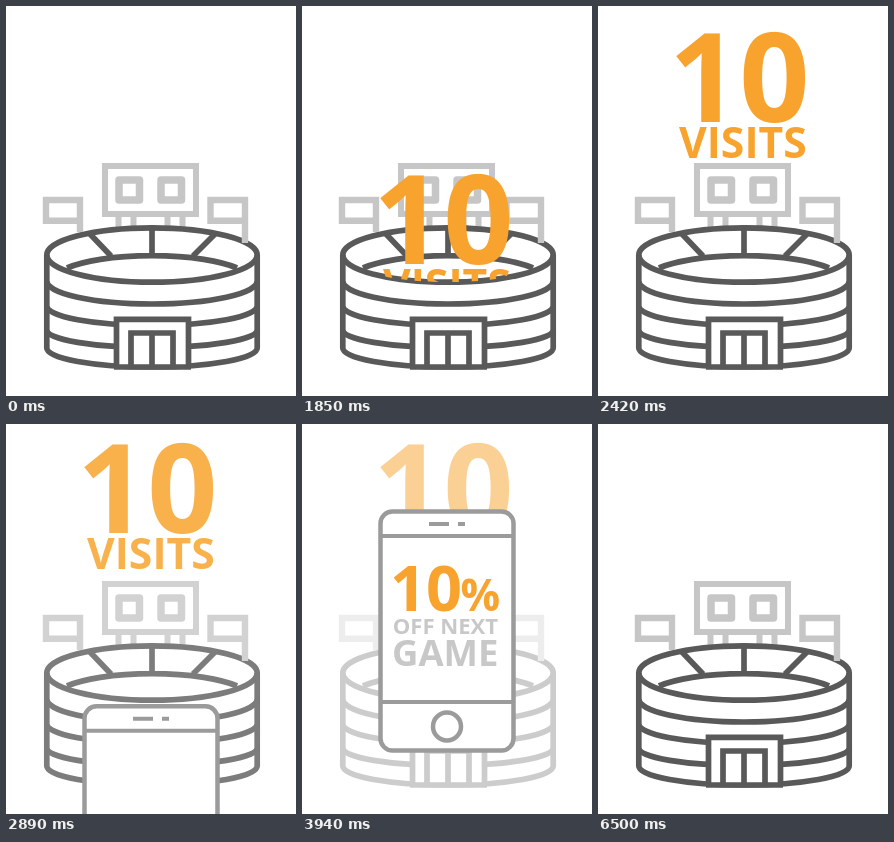
Recreate the animation shown at these times as an HTML page. Size 290 by 390 pixels, loop 6700 ms.

```html
<!DOCTYPE html>
<html lang="en">
<head>
<meta charset="utf-8">
<title>Stadium visits reward</title>
<style>
html, body { margin: 0; width: 100%; height: 100%; overflow: hidden; background: #fff; }
svg { display: block; width: 100%; height: 100%; }
text { font-family: "Open Sans", sans-serif; font-weight: 700; fill: #f8a32d; }
.gray text { fill: #c8c8c8; }
</style>
</head>
<body>
<svg viewBox="0 0 290 390">
  <defs>
    <clipPath id="aboveRim">
      <path d="M0 0H290V249H251.5A105.5 27 0 0 1 40.5 249H0Z"/>
    </clipPath>
    <g id="stadium" fill="none" stroke-width="5.7">
      <g stroke="#c6c6c6" stroke-width="6">
        <path d="M99 160H190V208H99ZM112.5 209V222M127.5 209V222M161.5 209V222M176.5 209V222"/>
        <path d="M113 174H133.5V194H113ZM155 174H175.5V194H155Z" stroke-width="7.5" stroke-linejoin="round"/>
      </g>
      <g stroke="#595959">
        <ellipse cx="146" cy="249" rx="105.2" ry="27.2"/>
        <path d="M61 262A100 26 0 0 1 231 262M84 228L105 250M146 223V250M209 228L187 250"/>
        <path d="M40.8 249V342A105.2 19 0 0 0 251.2 342V249"/>
        <path d="M40.8 275A105.2 23 0 0 0 251.2 275M40.8 300A105.2 19.5 0 0 0 251.2 300M40.8 324A105.2 17.5 0 0 0 251.2 324"/>
        <path d="M110.5 360V313.3H182.5V360" fill="#fff"/>
        <path d="M125 361V327H167V361M146 327V361M108 361H185"/>
      </g>
      <path d="M74 226V194H40V214.8H74M239 237V194H204.5V214.8H239" stroke="#c6c6c6" stroke-width="6.4"/>
    </g>
  </defs>

  <use href="#stadium"/>
  <g id="scene">
    <rect width="290" height="390" fill="#fff"/>
    <use id="backdrop" href="#stadium"/>
    <g clip-path="url(#aboveRim)">
      <g id="visits">
        <text x="71" y="109" font-size="123">10</text>
        <text x="81" y="144.6" font-size="42.7">VISITS</text>
      </g>
    </g>
    <circle id="burst" cx="144.5" fill="none" stroke="#f8a32d"/>
    <g id="phone">
      <g fill="#fff" stroke="#9b9b9b" stroke-width="4.5">
        <rect x="78.5" y="87.5" width="133" height="239" rx="12"/>
        <path d="M79 112H211M79 278H211M127 100H147M156 100H163" stroke-width="4"/>
        <circle cx="145" cy="302.5" r="14"/>
      </g>
      <g id="offer">
        <text x="88" y="187" font-size="63">10</text>
        <text x="158.5" y="187" font-size="44">%</text>
        <g class="gray">
          <text x="90.7" y="209.5" font-size="22.1">OFF NEXT</text>
          <text x="90" y="242" font-size="36.5">GAME</text>
        </g>
      </g>
    </g>
  </g>
</svg>
<script>
const LOOP = 6700, STEP = 30;
const el = id => document.getElementById(id);
const set = (id, attrs) => {
  for (const name in attrs) el(id).setAttribute(name, attrs[name]);
};
const clamp = v => Math.max(0, Math.min(1, v));
// Progress from 0 to 1 in `count` equal steps
const progress = (t, start, count) => clamp(Math.floor((t - start) / STEP) / count);
const shift = y => `translate(0 ${y})`;

function draw(now) {
  const t = now % LOOP;
  const rise = progress(t, 1430, 34);
  const slide = progress(t, 2680, 23);
  const blast = progress(t, 3370, 19);
  const reset = progress(t, 6110, 13);

  set("scene", { opacity: 1 - reset });
  set("backdrop", { opacity: 1 - 0.7 * slide });
  set("visits", {
    transform: shift(253.5 * (1 - rise)),
    opacity: t < 1430 ? 0 : 1 - 0.5 * slide
  });
  set("phone", {
    transform: shift(280 * (1 - slide)),
    opacity: t < 2680 ? 0 : 1
  });

  // Disc that spreads, sinks and hollows out into a thin ring
  const radius = 124 * (1 - (1 - blast) ** 4);
  set("burst", {
    cy: 194 + 26 * clamp((blast - 0.21) / 0.79),
    r: radius * (1 + blast) / 2,
    "stroke-width": radius * (1 - blast)
  });
  set("offer", { opacity: clamp((blast - 0.26) / 0.74) });
  requestAnimationFrame(draw);
}
draw(performance.now());
</script>
</body>
</html>
```
